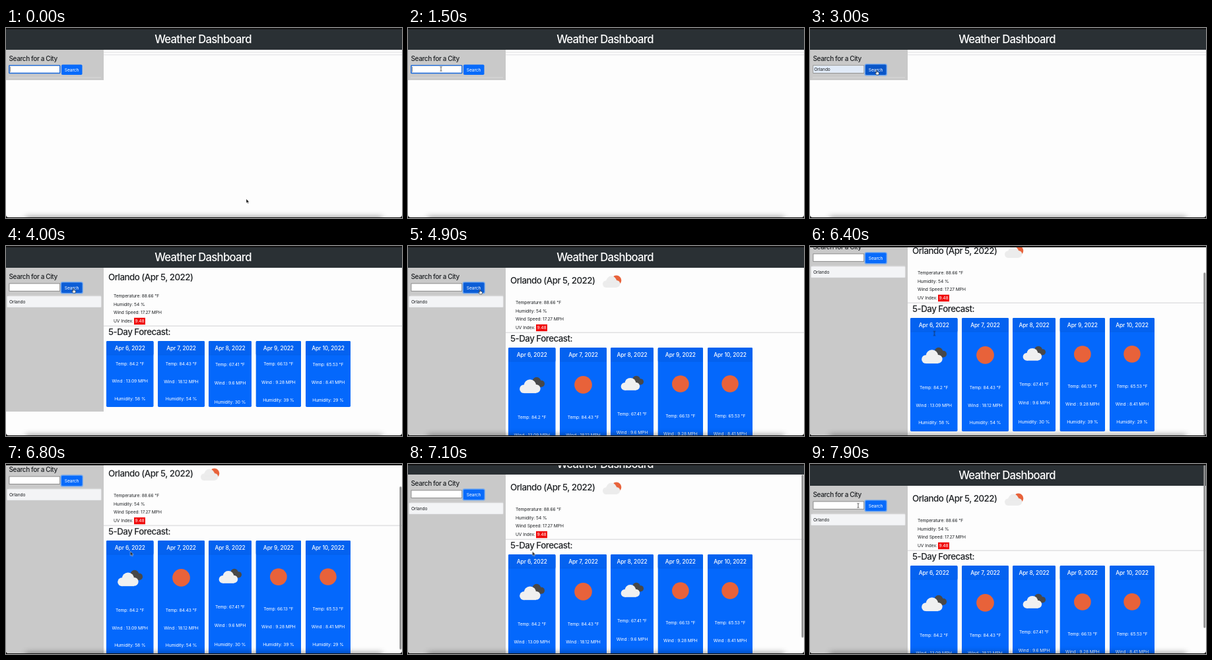
An HTML page for the animation above (8 s loop, 600 by 288 pixels).

```html
<!DOCTYPE html>
<html lang="en">
<head>
<meta charset="utf-8">
<title>Weather Dashboard</title>
<style>
@property --scroll { syntax: "<number>"; inherits: true; initial-value: 0; }
/* 1 while the icons are still loading, then 0 */
@property --wait { syntax: "<number>"; inherits: true; initial-value: 0; }

html, body { margin: 0; width: 100%; height: 100%; overflow: hidden; background: #111; }
svg {
  display: block; width: 600px; height: 288px;
  font: 6.667px Inter, "Liberation Sans", sans-serif;
  letter-spacing: -.012em; fill: #1c1f22;
  animation: scroll 8s linear infinite, wait 8s step-end infinite;
}
text { white-space: pre; }
.h1, .h2, .h4 { font-weight: 500; letter-spacing: -.038em; }
.h1 { font-size: 16.667px; letter-spacing: -.042em; fill: #fff; }
.h2 { font-size: 13.333px; }
.h4 { font-size: 10px; }
.h5 { font-size: 8.333px; font-weight: 500; letter-spacing: -.01em; }
.mid { text-anchor: middle; }

@keyframes scroll {
  0%, 70% { --scroll: 0; }
  72.5% { --scroll: 4; }
  75% { --scroll: 16; }
  77.5% { --scroll: 33; }
  80%, 83.75% { --scroll: 45; }
  88.75% { --scroll: 17; }
  93.75% { --scroll: 1.5; }
  95%, 100% { --scroll: 0; }
}
@keyframes wait { 0% { --wait: 1; } 60%, 100% { --wait: 0; } }

.page { transform: translateY(calc(var(--scroll) * -1px)); }
.thumb { transform: translateY(calc(var(--scroll) * .86px)); }
.lift { transform: translateY(calc(var(--wait) * -10px)); }
.nudge { transform: translateY(calc(var(--wait) * -5px)); }
.icon { opacity: calc(1 - var(--wait)); }
.rows { transform: translateY(calc(var(--wait) * var(--size) * -1px)); }
.card { height: calc(172px - var(--wait) * 72px); }

.step { animation: 8s step-end infinite; }
.side { animation-name: side; }
.caret { animation-name: caret; }
.ring { animation-name: ring; }
.fill { animation-name: fill; }
.menu { animation-name: menu; }
.pick { animation-name: pick; }
.button { animation-name: button; }
.glow { animation-name: glow; }
.item { animation-name: item; }
.empty { animation-name: empty; }
.now { animation-name: now; }
.days { animation-name: days; }
.thumb { animation-name: thumb; }

@keyframes side {
  0% { height: 46px; }
  40% { height: 64px; }
  48.75% { height: 114px; }
  50% { height: 218px; }
  60%, 100% { height: 300px; }
}
@keyframes caret { 0%, 10% { opacity: 1; } 3.75%, 22.5%, 100% { opacity: 0; } }
@keyframes ring { 0% { opacity: 1; } 36.25%, 100% { opacity: 0; } }
@keyframes fill { 0%, 40%, 100% { opacity: 0; } 28.75% { opacity: 1; } }
@keyframes menu { 0%, 31.25%, 100% { opacity: 0; } 25% { opacity: 1; } }
@keyframes pick { 0%, 100% { opacity: 0; } 28.75% { opacity: 1; } }
@keyframes button {
  0%, 66.25%, 100% { fill: #086bfb; }
  33.75%, 40% { fill: #0b5dd6; }
  36.25% { fill: #0a56c8; }
}
@keyframes glow { 0% { opacity: 0; } 36.25%, 100% { opacity: 1; } }
@keyframes item { 0% { opacity: 0; } 40%, 100% { opacity: 1; } }
@keyframes empty { 0% { opacity: 1; } 48.75%, 100% { opacity: 0; } }
@keyframes now { 0% { opacity: 0; } 48.75%, 100% { opacity: 1; } }
@keyframes days { 0% { opacity: 0; } 50%, 100% { opacity: 1; } }
@keyframes thumb { 0% { opacity: 0; } 71.25%, 100% { opacity: 1; } }

.cursor { animation: move 8s ease-in-out infinite; }
.arrow { animation-name: arrow; }
.beam { animation-name: beam; }
.hand { animation-name: hand; }
@keyframes move {
  0% { transform: translate(364px, 259px); }
  11.25% { transform: translate(94px, 76px); }
  18.75%, 25% { transform: translate(50px, 62px); }
  28.75%, 31.25% { transform: translate(42px, 77px); }
  36.25%, 48.75% { transform: translate(101px, 64px); }
  53.75%, 65% { transform: translate(109px, 66px); }
  71.25%, 91.25% { transform: translate(188.5px, 132.5px); }
  97.5%, 100% { transform: translate(73px, 63px); }
}
@keyframes arrow {
  0%, 27.5%, 66.25%, 85% { opacity: 1; }
  13.75%, 33.75%, 72.5%, 95%, 100% { opacity: 0; }
}
@keyframes beam {
  0%, 27.5%, 85% { opacity: 0; }
  13.75%, 72.5%, 95%, 100% { opacity: 1; }
}
@keyframes hand { 0%, 66.25%, 100% { opacity: 0; } 33.75% { opacity: 1; } }
</style>
</head>
<body>
<svg viewBox="0 0 600 288">
  <defs>
    <clipPath id="window"><path d="M0 2H600V283Q600 287 596 287H4Q0 287 0 283Z"/></clipPath>
    <filter id="soft" x="-10%" y="-200%" width="120%" height="500%"><feGaussianBlur stdDeviation="5"/></filter>
    <g id="puff">
      <circle cx="33" cy="58" r="9"/><circle cx="46" cy="51" r="13"/>
      <circle cx="59" cy="57.5" r="9"/><rect x="33" y="54" width="26" height="13"/>
    </g>
    <g id="clouds">
      <g fill="#484848">
        <circle cx="60" cy="42" r="9"/><circle cx="70" cy="47" r="7"/>
        <rect x="54" y="44" width="16" height="10"/>
      </g>
      <use href="#puff" fill="#f0f0f0"/>
    </g>
    <circle id="sun" cx="50" cy="49.5" r="18.8" fill="#e8623a"/>
  </defs>

  <g clip-path="url(#window)">
    <rect width="600" height="288" fill="#fdfdfd"/>
    <g class="page">
      <rect width="600" height="33" fill="#2a3034"/>
      <text class="h1 mid" x="298.5" y="22.5">Weather Dashboard</text>

      <path class="step empty" d="M148 37H600M148 40.7H600" stroke="#d9d9db" stroke-width=".8"/>

      <rect class="step side" y="33" width="148" height="46" fill="#c9c9c9"/>
      <text class="h4" x="4.5" y="49.5">Search for a City</text>
      <path d="M4 75.2H144" stroke="#dedede" stroke-width=".8"/>

      <rect x="4.9" y="56.9" width="76.8" height="11.4" fill="#fff" stroke="#767676" stroke-width=".8"/>
      <g class="step fill">
        <rect x="5.3" y="57.3" width="76" height="10.6" fill="#e1ebf8"/>
        <text x="6.3" y="64.8">Orlando</text>
      </g>
      <rect class="step ring" x="4.8" y="56.6" width="77" height="11.9" rx=".8" fill="none" stroke="#1a6be0" stroke-width="1.4"/>
      <path class="step caret" d="M6.7 58.8V66.6" stroke="#222" stroke-width=".6"/>

      <rect class="step glow" x="82.6" y="54.2" width="34.2" height="18.2" rx="2.6" fill="#6ea6f0"/>
      <rect class="step button" x="84" y="55.6" width="31.5" height="15.4" rx="1.7"/>
      <text class="mid" x="99.6" y="65.8" fill="#fff">Search</text>

      <g class="step item">
        <rect x="1.5" y="75.9" width="142.8" height="17" rx="1" fill="#f3f4f6" stroke="#d6d8da" stroke-width=".5"/>
        <text x="5" y="86.8">Orlando</text>
      </g>

      <g class="step now">
        <g class="nudge">
          <text class="h2" x="155" y="57.4">Orlando (Apr 5, 2022)</text>
        </g>
        <g class="icon">
          <circle cx="315.7" cy="52" r="7.6" fill="#e8623a"/>
          <use href="#puff" fill="#ececec" transform="translate(280.6 22.8) scale(.6)"/>
        </g>
        <g class="lift">
          <text x="163" y="87.5">Temperature: 88.66 °F</text>
          <text x="163" y="100.5">Humidity: 54 %</text>
          <text x="163" y="113.4">Wind Speed: 17.27 MPH</text>
          <text x="163" y="126.4">UV Index:</text>
          <rect x="194" y="118.8" width="17" height="10.4" fill="#f00808"/>
          <text class="mid" x="202.5" y="126.4" fill="#fff">9.48</text>
          <path d="M148 131.2H600" stroke="#cfcfd1" stroke-width=".9"/>
          <text class="h2" x="155" y="144.6">5-Day Forecast:</text>
        </g>
      </g>
      <g class="step days"><g class="lift" id="cards" fill="#fff"></g></g>
    </g>

    <g class="step menu">
      <rect x="4" y="70" width="78" height="50" rx="1.5" fill="#fff" stroke="#c4c4c4" stroke-width=".6"/>
      <rect class="step pick" x="4.3" y="72" width="77.4" height="14" fill="#e6e6e6"/>
      <text x="8" y="81.4">Orlando</text>
    </g>

    <rect class="step thumb" x="596.3" y="1.5" width="3" height="247" rx="1.5" fill="#8f8f8f"/>
    <rect x="30" y="286" width="540" height="14" fill="#000" opacity=".4" filter="url(#soft)"/>
  </g>

  <g class="cursor">
    <path class="step arrow" d="M0 0V6.4L1.5 5.1 2.5 7.3 3.6 6.8 2.6 4.7H4.6Z" fill="#111" stroke="#fff" stroke-width=".5"/>
    <path class="step beam" d="M-1.5 -3.4Q0 -3.4 0 -2.4Q0 -3.4 1.5 -3.4M0 -2.4V2.4M-1.5 3.4Q0 3.4 0 2.4Q0 3.4 1.5 3.4" fill="none" stroke="#222" stroke-width=".7"/>
    <path class="step hand" d="M-.6 .5Q0 -.4 .6 .5V2.6L3.1 3.2Q3.8 3.5 3.6 4.4L3 6.9H-.4L-2.3 4.2Q-2.2 3.3 -.6 4.4Z" fill="#fff" stroke="#111" stroke-width=".6"/>
  </g>
</svg>
<script>
// x, width, day, icon, temperature, wind, humidity, first and last row
const days = [
  [152, 71.5, 6, "clouds", "84.2", "13.09", 58, 261.6, 315],
  [230, 71, 7, "sun", "84.43", "18.12", 54, 261.4, 315],
  [307, 65, 8, "clouds", "67.41", "9.6", 30, 256.4, 313.6],
  [378.7, 68.3, 9, "sun", "66.13", "9.28", 39, 259, 314.4],
  [454, 68, 10, "sun", "65.53", "8.41", 29, 258.9, 314.4]
];

const line = (x, y, text, kind = "") => `<text class="mid ${kind}" x="${x}" y="${y}">${text}</text>`;

document.getElementById("cards").innerHTML = days.map(([x, w, day, icon, temp, wind, hum, top, end]) => {
  const mid = x + w / 2;
  return `
    <rect class="card" x="${x}" y="154" width="${w}" height="172" rx="1.7" fill="#0468fc"/>
    <rect x="${x}" y="154" width="${w}" height="21" rx="1.7" fill="#0462f0"/>
    <path d="M${x} 175h${w}" stroke="#0358d8" stroke-width=".5"/>
    ${line(mid, 167.8, `Apr ${day}, 2022`, "h5")}
    <use class="icon" href="#${icon}" transform="translate(${x} 175.2) scale(${w / 100})"/>
    <g class="rows" style="--size:${w}">
      ${line(mid, top + .6, `Temp: ${temp} °F`)}
      ${line(mid, (top + end) / 2 + .3, `Wind : ${wind} MPH`)}
      ${line(mid, end, `Humidity: ${hum} %`)}
    </g>`;
}).join("");
</script>
</body>
</html>
```
